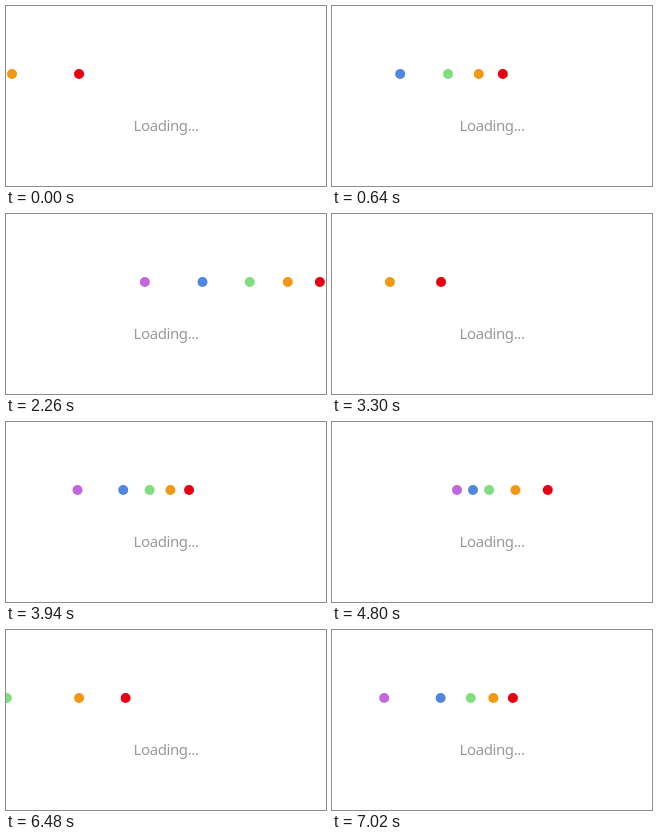
An HTML page that plays this animation: 320x180 px, repeating every 7.04 s.

```html
<!DOCTYPE html>
<html lang="en">
<head>
<meta charset="utf-8">
<title>Loading</title>
<style>
  html, body { margin: 0; width: 100%; height: 100%; overflow: hidden; background: #fff; }
  svg { display: block; width: 100%; height: 100%; }
  text { font: 15px "Noto Sans", "Open Sans", sans-serif; letter-spacing: -.4px; fill: #999; }
</style>
</head>
<body>
<svg viewBox="0 0 320 180">
  <g id="dots"></g>
  <text x="127.5" y="125">Loading...</text>
</svg>
<script>
const LOOP = 7040, TICK = 20;
const UNIT = 240;                 // stagger between neighbouring dots
const HOLD = 120;                 // pause in the middle and at the end
const TRAVEL = 6 * UNIT;
const CYCLE = 2 * (TRAVEL + HOLD);
const OFFSET = 380;               // the loop opens partway through a cycle
const IN_DISTANCE = 214, OUT_DISTANCE = 222;
const COLORS = ['#e60012', '#f39814', '#7fdf7f', '#4f86e0', '#c266e0'];

const dots = COLORS.map((color, i) => {
  const el = document.createElementNS('http://www.w3.org/2000/svg', 'circle');
  el.setAttribute('cy', 68);
  el.setAttribute('r', 5);
  el.setAttribute('fill', color);
  document.getElementById('dots').append(el);
  return { el, rest: 189 - 16 * i, delay: i * UNIT, duration: (6 - i) * UNIT };
});

const clamp01 = v => Math.min(1, Math.max(0, v));

// Each dot starts later but moves faster, so all arrive (and leave) together.
function dotX({ rest, delay, duration }, phase) {
  const arrive = clamp01((phase - delay) / duration);
  const leave = clamp01((phase - TRAVEL - HOLD - delay) / duration);
  return rest - IN_DISTANCE * (1 - arrive) ** 2 + OUT_DISTANCE * leave ** 2;
}

function render(time) {
  const t = Math.floor((time % LOOP) / TICK) * TICK;
  const phase = (t + OFFSET) % CYCLE;
  for (const dot of dots) dot.el.setAttribute('cx', dotX(dot, phase).toFixed(2));
}

const start = performance.now();
function frame() {
  render(performance.now() - start);
  requestAnimationFrame(frame);
}
frame();
</script>
</body>
</html>
```
